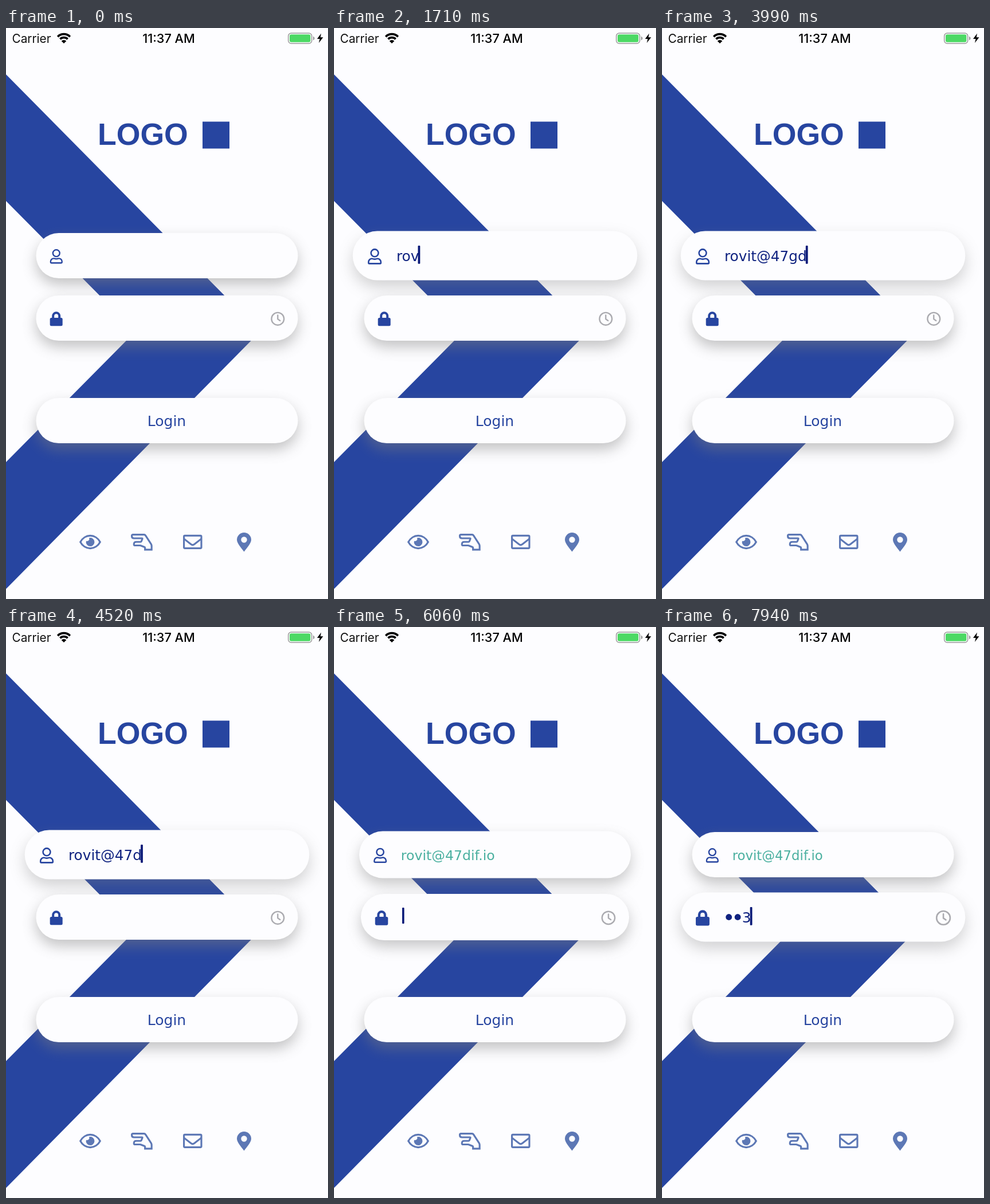
Animation, 562 px wide and 997 px high, one loop 8 s. Source, as an HTML page:

```html
<!DOCTYPE html>
<html lang="en">
<head>
<meta charset="utf-8">
<title>Login form</title>
<style>
  html, body { margin: 0; width: 100%; height: 100%; overflow: hidden; background: #fdfdff; }
  svg { display: block; width: 100%; height: 100%; }
  .ui { font-family: "DejaVu Sans", Verdana, sans-serif; }
  .status { font-family: Inter, "Liberation Sans", sans-serif; }
  .line { fill: none; stroke-linejoin: round; stroke-linecap: round; }
  .icon { fill: none; stroke-width: 48; }
  .box { fill: #fdfdff; }
  .shadow { fill: #808080; filter: url(#blur); opacity: var(--shade, .47); }
  .caret { fill: #0b1a78; }
</style>
</head>
<body>
<svg viewBox="0 0 562 997" preserveAspectRatio="none">
  <defs>
    <filter id="blur" x="-20%" y="-80%" width="140%" height="260%">
      <feGaussianBlur stdDeviation="12"/>
    </filter>
    <g id="pill">
      <rect class="shadow" x="-228.5" y="-28.5" width="457" height="79" rx="39.5"/>
      <rect class="box" x="-228.5" y="-39.5" width="457" height="79" rx="39.5"/>
    </g>
  </defs>

  <rect width="562" height="997" fill="#fdfdff"/>
  <path d="M0 81L443.5 530 0 979.5V758L225.7 530 0 302Z" fill="#2745a0"/>

  <!-- status bar -->
  <g class="status">
    <text x="10.5" y="26" font-size="20.8" fill="#111">Carrier</text>
    <text x="284" y="26" font-size="21.7" font-weight="500" text-anchor="middle">11:37 AM</text>
  </g>
  <g fill="none" stroke="#000" stroke-width="3.7">
    <path d="M90.2 15.2A15.2 15.2 0 0 1 111.8 15.2"/>
    <path d="M94.4 19.4A9.4 9.4 0 0 1 107.6 19.4"/>
  </g>
  <path d="M101 27L96.7 22.7A6 6 0 0 1 105.3 22.7Z"/>
  <rect x="492.7" y="9" width="41" height="18" rx="5" fill="none" stroke="#999" stroke-width="1.5"/>
  <rect x="495" y="11.2" width="36.4" height="13.6" rx="2.8" fill="#4cd964"/>
  <path d="M536 14.5Q538.6 15.5 538.6 18T536 21.5Z" fill="#999"/>
  <path d="M550 9.5L543 19H547.6L546 26 553.5 16.3H548.8Z"/>

  <!-- heading -->
  <text x="160" y="204" font-size="53.6" font-weight="700" fill="#2745a0"
        font-family="'Liberation Sans', Arial, sans-serif">LOGO</text>
  <rect x="343" y="163.5" width="47" height="47" fill="#2745a0"/>

  <g id="user">
    <use href="#pill"/>
    <g class="icon" stroke="#2745a0" transform="translate(-204.3 -11.4) scale(.0495)">
      <circle cx="224" cy="144" r="120"/>
      <path d="M134 328C73 328 24 377 24 438V464Q24 488 48 488H400Q424 488 424 464V438C424 377 375 328 314 328C285 328 271 344 224 344S163 328 134 328Z"/>
    </g>
    <text class="ui" x="-158.3" y="9" font-size="22.8"></text>
    <rect class="caret" width="3.5" rx="1"/>
  </g>

  <g id="pass">
    <use href="#pill"/>
    <rect x="-204.3" y="-.5" width="22" height="14.3" rx="2.5" fill="#2745a0"/>
    <path class="line" d="M-198.8 1V-3.7A5.5 5.5 0 0 1-187.8-3.7V1" stroke="#2745a0" stroke-width="4"/>
    <g class="line" stroke="#ababb0" stroke-width="2.4">
      <circle cx="193.3" cy="1.3" r="10.9"/>
      <path d="M193.3-5V1.8L197.3 4.4"/>
    </g>
    <g class="dots" fill="#0f2280"></g>
    <text class="ui" y="9" font-size="22.8" fill="#0f2280"></text>
    <rect class="caret" width="3.5" rx="1"/>
  </g>

  <use href="#pill" x="281" y="685.5"/>
  <text class="ui" x="280.5" y="695" font-size="25" text-anchor="middle" fill="#2745a0">Login</text>

  <!-- footer icons -->
  <g class="icon" stroke="#5d78b5">
    <g transform="translate(128 880.6) scale(.066)">
      <path d="M27 256C79 155 178 88 288 88S497 155 549 256C497 357 398 424 288 424S79 357 27 256Z"/>
      <path fill="#5d78b5" stroke="none" d="M288 144Q272 144 257 149A56 56 0 0 1 181 225A112 112 0 1 0 288 144Z"/>
    </g>
    <path transform="translate(218 881) scale(.0655)" d="M376 456H552V356Q552 327 536 303L390 78Q376 56 350 56H56Q24 56 24 88V96Q24 152 80 152H293Q311 152 305 169L280 233Q274 248 258 248H144Q80 248 80 312Q80 344 112 344H244Q253 344 261 347L360 386Q376 392 376 408Z"/>
    <g transform="translate(309 880.6) scale(.0655)">
      <rect x="24" y="88" width="464" height="336" rx="24"/>
      <path d="M24 172L208 316Q256 354 304 316L488 172"/>
    </g>
  </g>
  <path fill="#5d78b5" fill-rule="evenodd" d="M415.5 914.5C411 908 403 900 403 893.5A12.5 12.5 0 0 1 428 893.5C428 900 420 908 415.5 914.5ZM410.3 893.5A5.2 5.2 0 1 0 420.7 893.5A5.2 5.2 0 1 0 410.3 893.5Z"/>
</svg>
<script>
const LOOP = 8000, LEFT = -158.3, DOT = 14.2, ZOOM = 0.0868;
const NAVY = "#0f2280", TEAL = "#4bb0a0";
const email = "rovit@47dif.io";
const head = n => email.slice(0, n);

// Each list holds [start time, value]; a value lasts until the next one.
const userText = [
  [0, ""], [1370, head(1)], [1570, head(2)], [1710, head(3)], [1840, head(4)],
  [2240, head(5)], [2640, head(6)], [3050, head(7)], [3450, head(8)],
  [3990, head(8) + "gd"], [4190, head(8) + "g"], [4390, head(8)], [4520, head(9)],
  [4860, head(10)], [5190, head(11)], [5390, head(12)], [5460, head(13)], [6000, email]
];
const passText = [[0, ""], [7340, "1"], [7610, "12"], [7940, "123"]];
const userFocus = [[0, 0], [500, .1], [570, .45], [630, 1], [6000, .85], [6060, .43], [6130, 0]];
const passFocus = [[0, 0], [6000, .05], [6060, .28], [6130, 1]];
const fade = start => [1, .75, .45, .2, 0].map((v, i) => [start + i * 65, v]);
const userCaret = [[0, 0], [500, 1], ...fade(970), [1370, 1], [6000, 0]];
const passCaret = [[0, 0], [6000, 1], ...fade(6470), [7000, .35], [7070, .7], [7140, 1]];

const at = (list, t) => list.reduce((v, [start, next]) => start <= t ? next : v, list[0][1]);

function field(id, cy) {
  const root = document.getElementById(id);
  return { root, cy, text: root.querySelector("text"), caret: root.querySelector(".caret") };
}
const user = field("user", 397.5), pass = field("pass", 506.5);
const dots = pass.root.querySelector(".dots");

function focus(f, amount) {
  f.root.setAttribute("transform", `translate(281 ${f.cy}) scale(${1 + ZOOM * amount})`);
  f.root.style.setProperty("--shade", .47 - .12 * amount);
}

function placeCaret(f, end, alpha, y = -1.5, height = 29.4) {
  const x = Math.max(LEFT + 1.9, end);
  f.caret.setAttribute("x", x - 1.75);
  f.caret.setAttribute("y", y - height / 2);
  f.caret.setAttribute("height", height);
  f.caret.setAttribute("opacity", alpha);
}

function draw(t) {
  focus(user, at(userFocus, t));
  user.text.textContent = at(userText, t);
  user.text.setAttribute("fill", t < 6000 ? NAVY : TEAL);
  placeCaret(user, LEFT + user.text.getComputedTextLength(), at(userCaret, t));

  focus(pass, at(passFocus, t));
  const typed = at(passText, t), hidden = Math.max(0, typed.length - 1);
  dots.innerHTML = Array.from({ length: hidden }, (_, i) =>
    `<circle cx="${LEFT + DOT * (i + .5)}" cy="0" r="5"/>`).join("");
  const x = LEFT + DOT * hidden;
  pass.text.textContent = typed.slice(hidden);
  pass.text.setAttribute("x", x);
  const end = x + pass.text.getComputedTextLength();
  if (typed) placeCaret(pass, end, at(passCaret, t));
  else placeCaret(pass, end, at(passCaret, t), -2.5, 27.4);
}

const begin = performance.now();
function tick() {
  draw((performance.now() - begin) % LOOP);
  requestAnimationFrame(tick);
}
tick();
</script>
</body>
</html>
```
